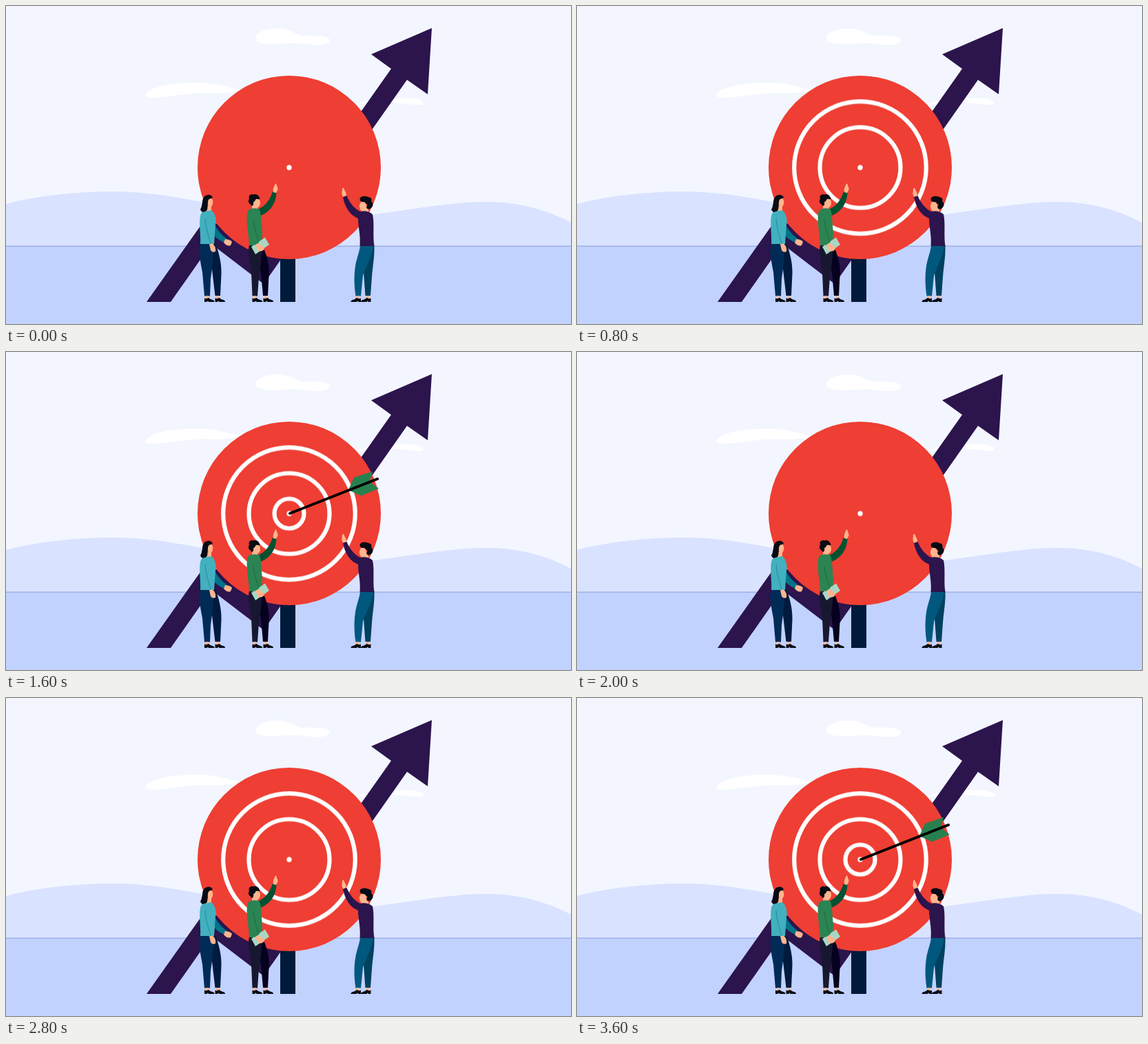
Recreate the animation shown at these times as an HTML page. Size 820 by 461 pixels, loop 4000 ms.

```html
<!DOCTYPE html>
<html lang="en">
<head>
<meta charset="utf-8">
<title>On target</title>
<style>
html, body { margin: 0; width: 100%; height: 100%; overflow: hidden; background: #f3f6ff; }
svg { display: block; width: 100%; height: 100%; }
.ring { fill: none; stroke: #fff; stroke-width: 6.2; }
.skin { fill: #ffb58e; }
.hair, .shoe { fill: #080b14; }
.step { opacity: 0; animation: 2s step-end infinite; }
.outer { animation-name: outer; }
.middle { animation-name: middle; }
.inner { animation-name: inner; }
.dart { animation-name: dart; }
@keyframes outer { 0% { opacity: 0 } 20%, 100% { opacity: 1 } }
@keyframes middle { 0% { opacity: 0 } 40%, 100% { opacity: 1 } }
@keyframes inner { 0% { opacity: 0 } 60%, 100% { opacity: 1 } }
@keyframes dart { 0% { opacity: 0 } 80%, 100% { opacity: 1 } }
</style>
</head>
<body>
<svg viewBox="0 0 820 461" preserveAspectRatio="none">
  <defs>
    <path id="shoe" d="M0 0.5Q3 2 6 0Q9 3 13 3.5Q15 4.500 14.500 6H6L5 4.500L3.500 6H0Z"/>
  </defs>
  <rect width="820" height="461" fill="#f3f6ff"/>

  <g fill="#fff">
    <path d="M362 47C364 36 382 32 400 33C416 34 420 43 432 43C446 42 468 43 470 49C470 56 455 58 440 56C425 53 410 54 395 55C378 56 362 54 362 47Z"/>
    <path d="M203 128C208 118 238 111 277 111C302 111 322 117 340 122C322 128 304 126 285 126C258 127 238 132 215 133C205 133 201 131 203 128Z"/>
    <path d="M508 142C530 136 570 132 592 134C606 136 610 143 602 143.500C585 144 572 139 552 140C535 141 520 144 508 142Z"/>
  </g>

  <path fill="#d9e2ff" d="M0 287C40 276 100 269 155 269C205 269 245 277 290 285L400 310L500 306C570 299 640 284 697 284C750 284 790 298 820 314V348H0Z"/>
  <path fill="#c2d2ff" d="M0 348H820V461H0Z"/>
  <path stroke="#90abe4" stroke-width="1.3" d="M0 348.200H820"/>

  <path fill="#2c144d" d="M204 429L292 305L367.500 362.500L559 91L530 70L618 32L612 128L582 107L374 403L298 345L239 429Z"/>
  <path fill="#001a3a" d="M398 360H420V429H398Z"/>

  <circle cx="411" cy="234" r="133" fill="#ef3e33"/>
  <g transform="translate(411 234.200)">
    <circle class="ring step outer" r="95.800"/>
    <circle class="ring step middle" r="58.500"/>
    <circle class="ring step inner" r="21.500"/>
    <circle r="3.700" fill="#fff"/>
  </g>

  <g class="step dart">
    <path fill="#28804f" d="M497 200L505 182L532 173L528 188L541 198L515 208.500Z"/>
    <path stroke="#000" stroke-width="4" stroke-linecap="round" d="M412 234L539 184"/>
  </g>

  <!-- woman -->
  <g>
    <path fill="#007489" d="M300 312C305 322 311 331 320 337L317 343C308 339 302 334 297 327Z"/>
    <path class="skin" d="M318 338Q325 338 328 342L326 347Q321 349 316 343Z"/>
    <path class="skin" d="M290 290H298V300H289Z"/>
    <ellipse class="skin" cx="296.300" cy="284.500" rx="4" ry="6.800"/>
    <path class="hair" d="M285 285C285 276 291 272.500 296 274C300 275 301 279 298 279C295 279 293 281 293 285C292 291 294 297 288 299Q284 300 282 295C284 292 284 289 285 285Z"/>
    <path fill="#001b3f" d="M293 344H304C309 358 313 372 312.500 388L311 420H303.500L299 382Z"/>
    <path fill="#002b57" d="M282 344H300C302 365 299 381 297 396L296 420.500H288L285 386C282 370 279 357 282 344Z"/>
    <path class="skin" d="M290 420H294L295 425H290ZM305 420H309L310 425H305Z"/>
    <path fill="#42b0bf" d="M283 301C287 297 290 298 293 297L298 296C303 300 306 308 304 317L302 345H282C283 330 279 312 283 301Z"/>
    <path fill="none" stroke="#1f7f94" stroke-width=".8" d="M289 308C290 323 294 332 297 345"/>
    <path class="skin" d="M295 345L300 344.500Q305 349 304 356Q299 358 297 354Z"/>
    <use href="#shoe" class="shoe" x="288" y="423"/>
    <use href="#shoe" class="shoe" x="303.500" y="423"/>
  </g>

  <!-- man with clipboard -->
  <g>
    <path fill="#045132" d="M364 295C374 292 382 284 387 269L392.500 270C392 286 384 299 367 305Z"/>
    <path class="skin" d="M388 270C387 265 389 262 391 257.500Q393 257 393 261Q395 263 394.500 266L392 271Z"/>
    <path class="skin" d="M357 286H365V297H357Z"/>
    <ellipse class="skin" cx="363.800" cy="285.500" rx="5.200" ry="7"/>
    <path class="hair" d="M354 287C350 284 353 280 353 279C351 275 356 272 359 273.500C363 271 367 275 368 278C370 282 365 279 363 280C361 281 362 284 359 284Q360 289 357 290Z"/>
    <path fill="#05011f" d="M362 347H372C378 360 383 375 381.500 391L380 420H373L370 387Z"/>
    <path fill="#17182f" d="M353 346H372C371 361 370 376 367 393L365 420.500H357.500L356 386C355 370 350 358 353 346Z"/>
    <path class="skin" d="M359 420H363L364 425H359ZM375 420H378L380 425H375Z"/>
    <path fill="#2b8452" d="M351 297C355 292 362 293 367 294C371 299 370 315 372 328L371 347H353C353 332 347 310 351 297Z"/>
    <path fill="#a9d7c5" d="M356 349L376 335.500L382 346L362 360Z"/>
    <path fill="#2b8452" d="M351 315L359 313C361 326 365 335 367 343L361 347C355 340 352 330 351 315Z"/>
    <path fill="none" stroke="#166139" stroke-width=".7" d="M359 310C361 326 365 335 367 343"/>
    <path class="skin" d="M362 346L367 344Q373 347 375 352Q372 357 366 355Z"/>
    <use href="#shoe" class="shoe" x="357.500" y="423"/>
    <use href="#shoe" class="shoe" x="373.500" y="423"/>
  </g>

  <!-- man on the right -->
  <g>
    <path class="skin" d="M489.500 277C486 272 488 270 488 265Q490 262 491 266C492 269 494 270 494 275Z"/>
    <path class="skin" d="M517 290H526V301H516Z"/>
    <ellipse class="skin" cx="518" cy="290.500" rx="5" ry="7.300"/>
    <path class="hair" d="M513.500 280C514 275 522 275 526 277C531 278 531 281 530 283C534 286 533 292 528 294Q524 296 523 291L525 288C521 287 523 284 518 284Q514 284 513.500 280Z"/>
    <path fill="#00415f" d="M519 347H534.500C535 365 532 378 531 393L529 420H521.500L519 386Z"/>
    <path fill="#00587f" d="M514 347H533C531 365 522 377 518 391L515 420.500H507.500C505 404 505 390 507 377C509 365 513 357 514 347Z"/>
    <path class="skin" d="M509 420H513V425H508ZM523 420H527V425H522Z"/>
    <path fill="#2c144d" d="M489 277L494.500 275C499 286 506 294 514 298C520 296 528 298 532 302C535 315 532 333 534.500 348H513.500C515 334 511 320 511 308C499 303 492 292 489 277Z"/>
    <use href="#shoe" class="shoe" transform="translate(515 423) scale(-1 1)"/>
    <use href="#shoe" class="shoe" transform="translate(529.500 423) scale(-1 1)"/>
  </g>
</svg>
</body>
</html>
```
